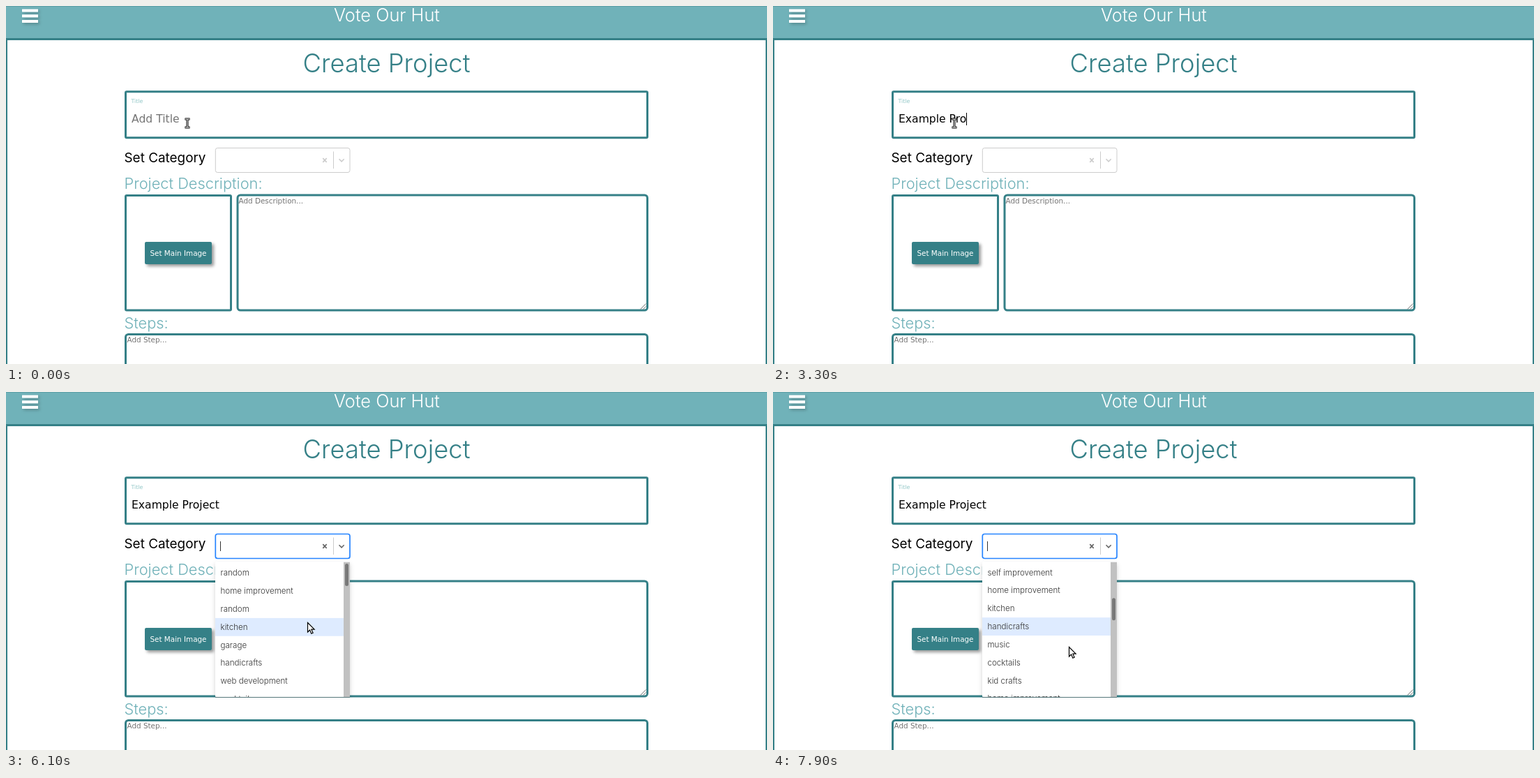
These frames come from a looping animation (1091 by 513 pixels, 8000 ms). An HTML page:

```html
<!DOCTYPE html>
<html lang="en">
<head>
<meta charset="utf-8">
<title>Create Project</title>
<style>
  html, body { margin: 0; width: 100%; height: 100%; overflow: hidden; background: #fff; }
  svg { display: block; width: 100vw; height: 100vh; font-family: Inter, sans-serif; font-optical-sizing: none; }
  text { white-space: pre; }
  .plain { font-family: "DejaVu Sans", sans-serif; font-size: 10.4px; fill: #757575; }
  .box { fill: #fff; stroke: #358087; stroke-width: 3; }
  .light { font-weight: 350; }
  .heading { font-size: 21.8px; fill: #6fb1b8; }
  .option { font-size: 11.6px; fill: #333; }
</style>
</head>
<body>
<svg viewBox="0 0 1091 513">
  <defs>
    <clipPath id="menuArea"><rect x="290" y="239" width="215" height="199"/></clipPath>
    <clipPath id="listArea"><rect x="300" y="243.5" width="193" height="194"/></clipPath>
    <filter id="menuShadow" x="-10%" y="-10%" width="120%" height="120%">
      <feDropShadow dx="0" dy="3" stdDeviation="3" flood-opacity=".18"/>
    </filter>
    <filter id="softShadow" x="-20%" y="-30%" width="140%" height="170%">
      <feDropShadow dx="3" dy="3" stdDeviation="2" flood-opacity=".4"/>
    </filter>
    <filter id="burgerShadow" filterUnits="userSpaceOnUse" x="15" y="0" width="45" height="40">
      <feDropShadow dx="2" dy="2" stdDeviation="2" flood-opacity=".25"/>
    </filter>
  </defs>

  <rect width="1091" height="513" fill="#fff"/>
  <rect width="1091" height="47" fill="#70b2b9"/>
  <rect width="1091" height="1" fill="#5c9fa6"/>
  <path d="M0 47.5H1091" stroke="#358087" stroke-width="3"/>
  <path d="M1 46V513M1090 46V513" stroke="#358087" stroke-width="2"/>
  <path d="M23 6.5h23M23 14.2h23M23 22h23" stroke="#fff" stroke-width="4" filter="url(#burgerShadow)"/>
  <text class="light" x="546" y="22" font-size="25.4" fill="#fff" text-anchor="middle">Vote Our Hut</text>
  <text class="light" x="545.5" y="95" font-size="36.4" fill="#358087" text-anchor="middle">Create Project</text>

  <rect class="box" x="171.5" y="122.8" width="748" height="66" rx="1.5"/>
  <text class="plain" x="179.5" y="138.5" style="font-size:7.8px;fill:#8fc5c5">Title</text>
  <text class="plain" id="title" x="180" y="167" style="font-size:15.6px"></text>
  <rect id="titleCaret" y="153" width="1" height="18"/>

  <text x="169.5" y="223.7" font-size="18.9">Set Category</text>
  <rect id="select" x="300.3" y="203.5" width="192.7" height="35" rx="3" fill="#fff"/>
  <path d="M469.5 208.5V233" stroke="#ccc"/>
  <path id="clear" d="M454.3 218.2l5.4 5.6m0-5.6l-5.4 5.6" stroke-width="1.7"/>
  <path id="chevron" d="M477.5 219.3l3.6 3.6l3.6-3.6" fill="none" stroke-width="1.5"/>
  <rect id="selectCaret" x="307" y="214" width="1" height="14" fill="#333"/>

  <text class="light heading" x="169.5" y="261.5">Project Description:</text>
  <rect class="box" x="171.5" y="271.5" width="151" height="164.5" rx="1.5"/>
  <rect class="box" x="332" y="271" width="587.5" height="165" rx="4"/>
  <path d="M909.5 434.5l8-8M913.5 434.5l4-4" stroke="#777"/>
  <text class="plain" x="333.5" y="282.5">Add Description...</text>
  <rect x="199" y="338" width="96" height="32" rx="2" fill="#358087" filter="url(#softShadow)"/>
  <text class="plain" x="247" y="357.5" text-anchor="middle" style="fill:#fff">Set Main Image</text>

  <text class="light heading" x="169.5" y="461.5">Steps:</text>
  <rect class="box" x="171.5" y="470.5" width="748" height="80" rx="4"/>
  <text class="plain" x="173.5" y="482">Add Step...</text>

  <g id="menu" clip-path="url(#menuArea)">
    <rect x="300" y="243.5" width="193" height="194" rx="2" fill="#fff" filter="url(#menuShadow)"/>
    <g clip-path="url(#listArea)">
      <g id="list"><rect id="highlight" x="300" width="184" fill="#deebff"/></g>
      <rect x="484" y="243.5" width="9" height="194" fill="#c1c1c1"/>
      <rect id="thumb" x="486" width="5" height="32" rx="2.5" fill="#787878"/>
    </g>
    <path d="M300 437.5H493" stroke="#55777b"/>
  </g>

  <g id="beam" fill="none">
    <path d="M-3.5 -6h7M-3.5 6h7M0 -6V6" stroke="#000" stroke-width="3"/>
    <path d="M-3 -6h6M-3 6h6M0 -6V6" stroke="#fff" stroke-width="1"/>
  </g>
  <path id="arrow" d="M.5 .5V14l3.1-2.9l2.2 5.1l2.3-1l-2.2-5h4.2z" fill="#fff" stroke="#000" stroke-width="1.2"/>
</svg>
<script>
const $ = id => document.getElementById(id);
const set = (id, attrs) => { for (const key in attrs) $(id).setAttribute(key, attrs[key]); };
const show = (id, visible) => set(id, { visibility: visible ? 'visible' : 'hidden' });

const LOOP = 8000, ROW = 25.83, LIST_TOP = 246.4;
const fullTitle = 'Example Project';
const options = ['random', 'home improvement', 'random', 'kitchen', 'garage', 'handicrafts',
  'web development', 'cocktails', 'self improvement', 'home improvement', 'kitchen',
  'handicrafts', 'music', 'cocktails', 'kid crafts', 'home improvement', 'random'];

// Each track lists [start time, value...]; a value holds until the next start.
const typed = [[0, 0], [1700, 1], [1900, 2], [2200, 3], [2400, 4], [2900, 7], [3000, 9],
  [3200, 10], [3300, 11], [3800, 12], [3900, 13], [4000, 14], [4200, 15]];
const pointer = [[0, 260, 168], [4600, 280, 172], [4800, 423, 206], [5000, 460, 215],
  [5200, 478, 218], [5900, 445, 246], [6100, 432, 330], [6200, 425, 392], [6700, 424, 365]];
const active = [[0, 0], [6100, 3], [6200, 5], [6700, 4], [7100, 6], [7600, 11]];
const scroll = [[0, 0], [7100, 50], [7200, 106], [7400, 159.5], [7600, 176], [7700, 190], [7900, 207.4]];
const border = [[0, '#ccc', 1], [5000, '#b3b3b3', 1], [5500, '#5a9fe2', 1.2], [5700, '#2684ff', 1.7]];
const icons = [[0, '#ccc'], [5500, '#999'], [5700, '#666']];

const at = (track, t) => track.findLast(step => step[0] <= t).slice(1);
const within = (t, from, to) => t >= from && t < to;

options.forEach((label, i) => {
  const text = document.createElementNS('http://www.w3.org/2000/svg', 'text');
  text.textContent = label;
  text.setAttribute('class', 'light option');
  text.setAttribute('x', 307.5);
  text.setAttribute('y', LIST_TOP + (i + 0.5) * ROW + 4);
  $('list').append(text);
});

function draw(t) {
  const [count] = at(typed, t);
  const title = $('title');
  title.textContent = count ? fullTitle.slice(0, count) : 'Add Title';
  title.style.fill = count ? '#000' : '#757575';
  set('titleCaret', { x: count ? Math.round(180 + title.getComputedTextLength()) : 180.5 });
  show('titleCaret', within(t, 500, 1600) || within(t, 1700, 5300));

  const [stroke, width] = at(border, t);
  set('select', { stroke, 'stroke-width': width });
  const [iconColor] = at(icons, t);
  set('clear', { stroke: iconColor });
  set('chevron', { stroke: iconColor });
  show('selectCaret', within(t, 5500, 6600) || t >= 7900);

  const [offset] = at(scroll, t);
  set('menu', { display: t >= 5500 ? 'inline' : 'none' });
  set('list', { transform: `translate(0 ${-offset})` });
  set('highlight', { y: LIST_TOP + at(active, t)[0] * ROW, height: ROW });
  set('thumb', { y: 246 + offset * 0.238 });

  const [x, y] = at(pointer, t);
  const overText = t < 4800;
  show('beam', overText);
  show('arrow', !overText);
  set(overText ? 'beam' : 'arrow', { transform: `translate(${x} ${y})` });
}

const start = performance.now();
function frame() {
  draw((performance.now() - start) % LOOP);
  requestAnimationFrame(frame);
}
frame();
</script>
</body>
</html>
```
